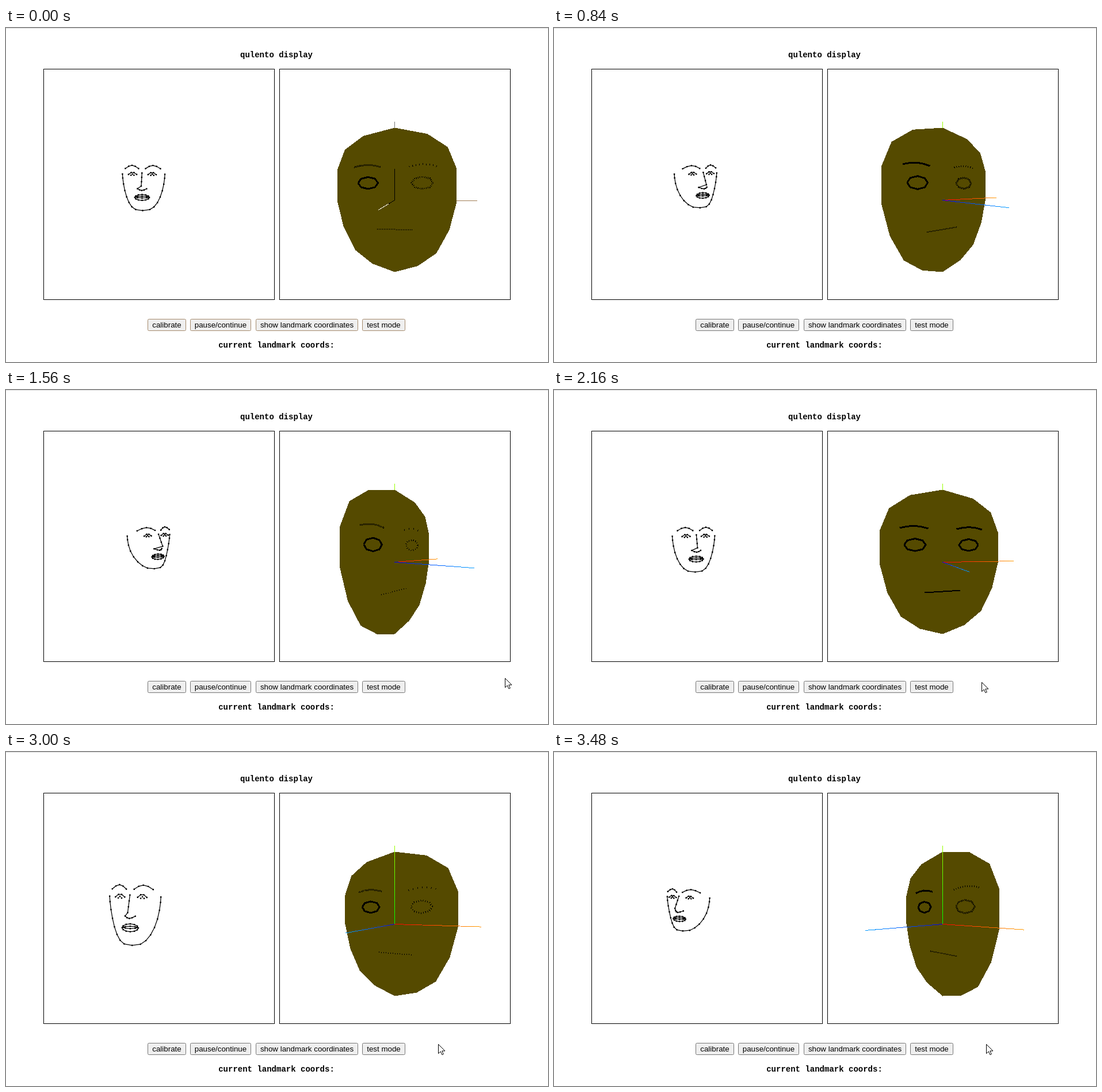
An HTML page that plays this animation: 942 px wide and 581 px high, repeating every 3.6 s.

```html
<!DOCTYPE html>
<html lang="en">
<head>
<meta charset="utf-8">
<title>Face tracking</title>
<style>
html, body { margin: 0; width: 100%; height: 100%; overflow: hidden; background: #fff; }
svg { display: block; }
.mono { font: bold 14px "Liberation Mono", "DejaVu Sans Mono", monospace; text-anchor: middle; }
.label { font: 13.333px "Liberation Sans", Arial, sans-serif; text-anchor: middle; }
.button { fill: #efefef; stroke: #767676; }
.first .button { stroke: #a58a6c; }
.panel { fill: none; stroke: #000; }
#face { fill: none; stroke: #000; stroke-width: 1.25; }
#mask { shape-rendering: crispEdges; fill: none; }
</style>
</head>
<body>
<svg id="stage" width="942" height="581" viewBox="0 0 942 581">
  <path d="M0 .5H942" stroke="#ddd"/>
  <text class="mono" x="470" y="51">qulento display</text>
  <rect class="panel" x="65.5" y="71.5" width="401" height="401"/>
  <rect class="panel" x="475.5" y="71.5" width="401" height="401"/>
  <g id="buttons"></g>
  <text class="mono" x="470" y="556">current landmark coords:</text>
  <g id="face"></g>
  <g id="mask"></g>
  <path id="cursor" d="M.5 .5V16.5L4.3 13 6.9 18.7 9.3 17.6 6.8 12H12Z" fill="#fff" stroke="#000"/>
</svg>
<script>
const $ = id => document.getElementById(id);
const { sin, cos, abs, max, PI } = Math;
const STEP = 120, STEPS = 30;

$('buttons').innerHTML = [
  [246, 313, 'calibrate'], [320, 426, 'pause/continue'],
  [434, 612, 'show landmark coordinates'], [619, 694, 'test mode']
].map(([l, r, s]) =>
  `<rect class="button" x="${l + .5}" y="506.5" width="${r - l - 1}" height="20" rx="2"/>` +
  `<text class="label" x="${(l + r) / 2}" y="521">${s}</text>`).join('');

// step, head turn in degrees
const turns = [[0, -7], [7, 33], [10, 47], [13, 45.3], [18, 11.5], [21, -61.5], [25, -22.3], [29, -42.5]];
// step, x, y
const pointer = [[13, 867, 501], [15, 743, 508], [21, 743, 508], [24, 751, 508]];

function at(rows, step) {
  const next = rows.findIndex(r => r[0] >= step);
  if (next < 0) return rows[rows.length - 1];
  if (!next) return rows[0];
  const a = rows[next - 1], b = rows[next], u = (step - a[0]) / (b[0] - a[0]);
  return a.map((v, i) => v + (b[i] - v) * u);
}

// n + 1 points of f(u) for u from 0 to 1
const curve = (n, f) => Array.from({ length: n + 1 }, (_, i) => f(i / n));
const oval = (n, x, y, rx, ry, z = 0) =>
  curve(n, u => [x + rx * cos(2 * PI * u), y + ry * sin(2 * PI * u), z]);
const mirror = pts => pts.map(([x, ...rest]) => [-x, ...rest]);
const line = pts => 'M' + pts.map(p => p.map(v => v.toFixed(1)).join(' ')).join('L');

// landmarks as x, y, depth
const jaw = curve(16, u => {
  const c = cos(PI * u), s = abs(sin(PI * u));
  return [-38 * Math.sign(c) * abs(c) ** .66, 62.5 * s ** 1.35, 10 * s ** 4];
});
const brow = curve(4, u => [32 - 25.5 * u, -9.5 - 5.5 * sin(PI * u), 8 + 8 * u]);
const lid = curve(3, u => [25.5 - 15 * u, .7 - 3.8 * sin(PI * u), 13]);
const under = curve(2, u => [21 - 5.5 * u, 2 - 2 * sin(PI * u), 13]);
const nose = [
  ...curve(3, u => [0, -2 + 22.5 * u, 17 + 7 * u]),
  ...curve(4, u => [-8.5 + 17 * u, 25 + 3 * sin(PI * u), 16 + 3 * sin(PI * u)])
];
const lips = oval(12, 0, 40, 13.5, 5, 16);
const gap = oval(8, 0, 39.5, 11.5, 1.5, 16);
const strokes = [jaw, brow, mirror(brow), lid, mirror(lid), nose, lips, gap];
const loose = [...under, ...mirror(under)];

function drawFace(yaw, step) {
  const s = sin(yaw * PI / 180), shift = 1.45 * s;
  const near = max(0, 1 - abs(step - 25) / 4);
  const cx = 240.5 + 10 * s - 12 * near, cy = 254.5 - 2.5 * abs(s) - 2 * near;
  const sx = .97 + .2 * near, sy = 1.03 - .14 * abs(s) + .38 * near;
  const place = ([x, y, z]) => [
    cx + sx * x * (1 - .012 * z * abs(shift)) + shift * z,
    cy + sy * y - .05 * s * x
  ];
  const shapes = strokes.map(pts => pts.map(place));
  const dots = [...shapes.flat(), ...loose.map(place)]
    .map(([x, y]) => `M${(x - 1.2).toFixed(1)} ${(y - 1.2).toFixed(1)}h2.4v2.4h-2.4z`).join('');
  $('face').innerHTML = `<path d="${shapes.map(line).join('')}"/><path d="${dots}" fill="#000" stroke="none"/>`;
}

// flat mask, in pixels around the rotation axis
const rim = [[56, 113.5], [90, 90], [104.5, 53.5], [104.5, -2], [92.5, -49], [71, -89.5], [39.5, -112.5]];
const outline = [[0, 126], ...rim, [0, -125], ...mirror(rim).reverse()];
const maskBrow = curve(4, u => [25 + 48 * u, 58 + 4 * sin(PI * u)]);
const maskEye = oval(8, 47.5, 30, 18, 10.5);
const shut = [[-31, -51.5], [32, -50.5]];
const open = oval(6, 1, -57.5, 19, 7);
const AXIS = 137;

function drawMask(yaw, step) {
  const c = cos(yaw * PI / 180), s = sin(yaw * PI / 180);
  const project = ([x, y, z = 0]) => {
    const depth = z * c - x * s, w = 1 - .00307 * depth;
    return [675.5 + (x * c + z * s) / w, 299.5 + (.0745 * depth - y) / w];
  };
  const draw = (pts, color, width = 1, dash = 'none') =>
    `<path d="${line(pts.map(project))}" stroke="${color}" stroke-width="${width}" stroke-dasharray="${dash}"/>`;
  const part = (dir, from, to, color) => draw([from, to].map(u => dir.map(v => v * u * AXIS)), color);
  const fade = (dir, color) => curve(13, u => part(dir, u * 13 / 14, (u * 13 + 1) / 14, color(153 * u | 0))).join('');

  let out = `<path d="${line(outline.map(project))}Z" fill="#554a00"/>`;

  // the features lie in the mask's plane, so they break up as it turns
  const breakup = 4 - 4 * cos((yaw - 15) / 75 * 2 * PI);
  const feature = (pts, share, width = 3) => {
    const hole = Math.floor(breakup * share);
    out += draw(pts, '#000', width, hole ? `1 ${hole}` : 'none');
  };
  feature(mirror(maskBrow), .25);
  feature(maskBrow, 1);
  feature(mirror(maskEye), 0);
  feature(maskEye, .5);
  feature(yaw < -55 ? open : shut, .5, yaw < -55 ? 3 : 2);

  const X = [1, 0, 0], Y = [0, 1, 0], Z = [0, 0, 1];
  if (!step) {
    out += part(X, .76, 1, '#a07c54') + part(Y, 0, .4, '#000') + part(Y, .92, 1, '#777') +
      part(Z, 0, .52, '#000') + part(Z, .52, 1, '#f4f0e0');
  } else {
    out += yaw < -15 ? fade(Y, g => `rgb(${g} 255 0)`) : part(Y, .92, 1, '#99ff00');
    out += fade(X, g => `rgb(255 ${g} 0)`) + fade(Z, g => `rgb(0 ${g} 255)`);
  }
  $('mask').innerHTML = out;
}

let shown = -1;
function tick() {
  const step = Math.floor(performance.now() / STEP) % STEPS;
  if (step !== shown) {
    shown = step;
    const [, yaw] = at(turns, step), [, px, py] = at(pointer, step);
    $('stage').classList.toggle('first', !step);
    drawFace(yaw, step);
    drawMask(yaw, step);
    $('cursor').setAttribute('transform', `translate(${Math.round(px)} ${Math.round(py)})`);
    $('cursor').setAttribute('visibility', step < 12 ? 'hidden' : 'visible');
  }
  requestAnimationFrame(tick);
}
tick();
</script>
</body>
</html>
```
